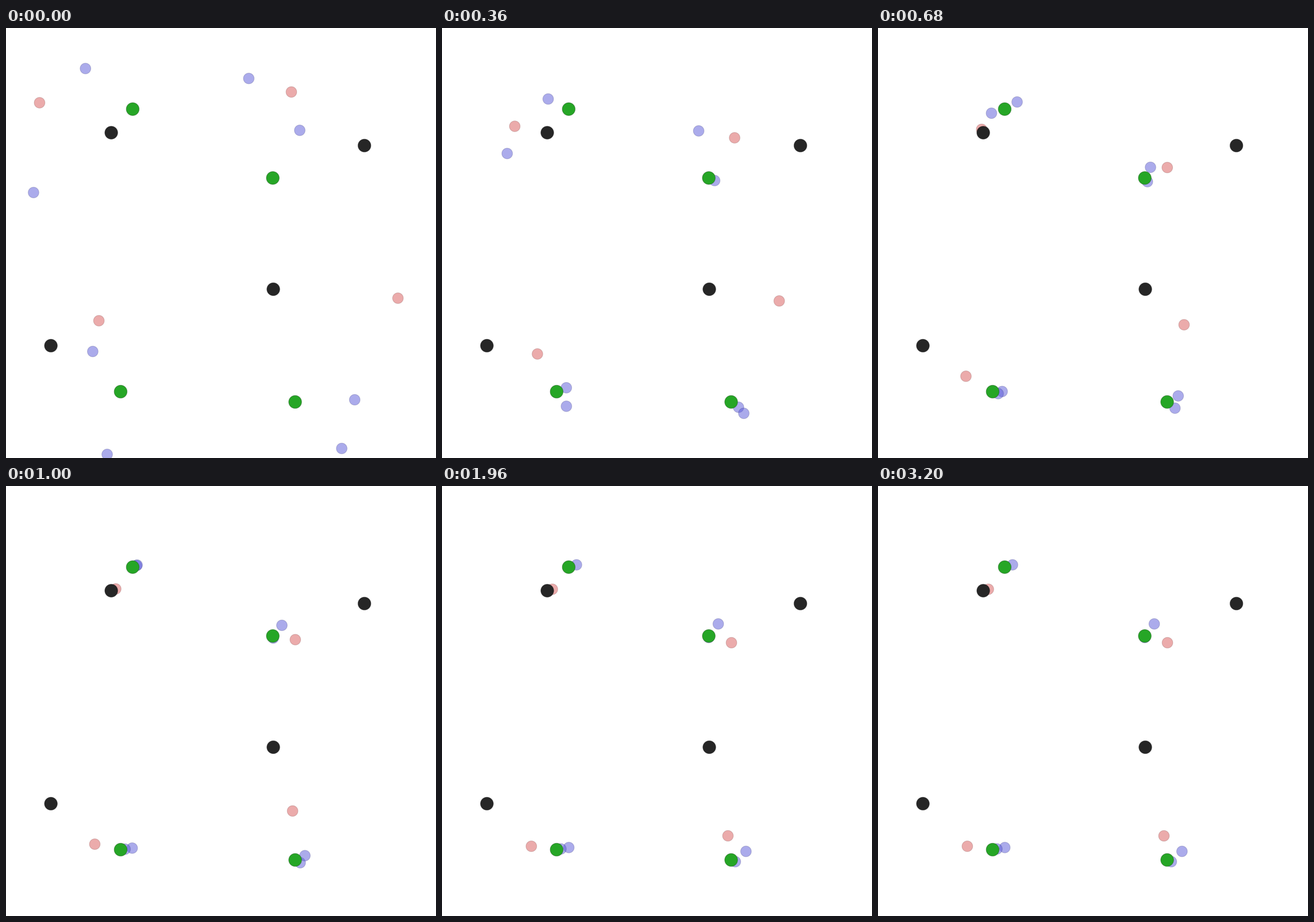
A matplotlib script for the animation above (3240 ms loop, 748 by 748 pixels).

```python
import numpy as np
import matplotlib.pyplot as plt
from matplotlib.animation import FuncAnimation
from matplotlib.patches import RegularPolygon

SIZE, DPI = 748, 100
FRAMES, INTERVAL = 81, 40
AGENT_R, LANDMARK_R = 9.35, 11.22
STRIDE = 8          # frames between two stops of a route
SETTLE = 0.35       # rate of the damped approach to rest
BLUE, RED = (0.35, 0.35, 0.85), (0.85, 0.35, 0.35)
GREEN, BLACK = (0.15, 0.65, 0.15), (0.15, 0.15, 0.15)

GOALS = [(220.4, 141.1), (464.1, 260.9), (199.4, 632.6), (503, 650.5)]
DECOYS = [(183.1, 182.1), (623.5, 204.5), (465, 454.4), (78.1, 552.6)]

# Each route: start, the stops where the agent turns, and its resting place.
CHASERS = [
    [(58.4, 130), (126.6, 171), (180.3, 176.3), (192, 179.6)],
    [(496.4, 111.3), (509, 191), (503.2, 242.7), (503.5, 272.6)],
    [(161.6, 509.2), (166, 567), (153, 605.8), (155.4, 626.7)],
    [(681.8, 470), (586.6, 474.8), (532.4, 516.2), (498.5, 565.3), (497.4, 608.6)],
]
PARTNERS = [
    [(138.2, 70.5), (184.7, 123.5), (242, 128.7), GOALS[0]],
    [(47.9, 286.2), (113.4, 218.3), (197.4, 148.2), (234, 137.1)],
    [(422.3, 87.8), (446.5, 179), (474, 242.3), (480.6, 239.9)],
    [(511, 178), (474.3, 265.4), (468.7, 267.3), (464, 263.6)],
    [(150.9, 562.7), (216.3, 625.8), (216, 632.3), (220.6, 628.9)],
    [(176, 741.7), (216.4, 658), (209, 636), (206.9, 631.3)],
    [(606.6, 646.7), (515.8, 659.7), (516.6, 661.3), (510.3, 653.5)],
    [(584, 731.4), (525, 670.3), (522.2, 640), (520, 643), (528.8, 635.6)],
]


def glide(frames, times, stops, vel):
    """Cubic Hermite curve through the stops."""
    i = np.clip(np.searchsorted(times, frames, "right") - 1, 0, len(times) - 2)
    h = (times[i + 1] - times[i])[:, None]
    u = (frames - times[i])[:, None] / h
    return ((1 + 2 * u) * (1 - u) ** 2 * stops[i]
            + u * (1 - u) ** 2 * h * vel[i]
            + u ** 2 * (3 - 2 * u) * stops[i + 1]
            + u ** 2 * (u - 1) * h * vel[i + 1])


def settle(elapsed, place, speed, rest):
    """Critically damped spring that pulls the agent to its resting place."""
    t = elapsed[:, None]
    offset = place - rest
    return rest + (offset + (speed + SETTLE * offset) * t) * np.exp(-SETTLE * t)


def trajectory(route):
    *stops, rest = np.array(route)
    times = 1 + STRIDE * np.arange(len(stops))
    times[0] = 0
    vel = np.gradient(stops, times, axis=0)
    vel[0] *= 0.25
    vel[-1] *= 0.5
    frames = np.arange(FRAMES)
    moving = frames <= times[-1]
    return np.vstack([
        glide(frames[moving], times, np.array(stops), vel),
        settle(frames[~moving] - times[-1], stops[-1], vel[-1], rest),
    ])


fig = plt.figure(figsize=(SIZE / DPI, SIZE / DPI), dpi=DPI, facecolor="white")
ax = fig.add_axes([0, 0, 1, 1])
ax.set(xlim=(0, SIZE), ylim=(SIZE, 0))
ax.axis("off")


def add_disc(xy, radius, color, alpha, zorder):
    rim = tuple(c / 2 for c in color) + (alpha / 2,)
    return ax.add_patch(RegularPolygon(
        xy, 30, radius=radius, facecolor=color + (alpha,), edgecolor=rim,
        linewidth=72 / DPI, zorder=zorder))


agents = [(add_disc(route[0], AGENT_R, color, 0.5, 1), trajectory(route))
          for color, routes in ((RED, CHASERS), (BLUE, PARTNERS))
          for route in routes]

for color, spots in ((GREEN, GOALS), (BLACK, DECOYS)):
    for spot in spots:
        add_disc(spot, LANDMARK_R, color, 1, 2)


def update(frame):
    for disc, path in agents:
        disc.xy = tuple(path[frame])
    return [disc for disc, _ in agents]


anim = FuncAnimation(fig, update, frames=FRAMES, interval=INTERVAL,
                     repeat=True, repeat_delay=0)
plt.show()
```
